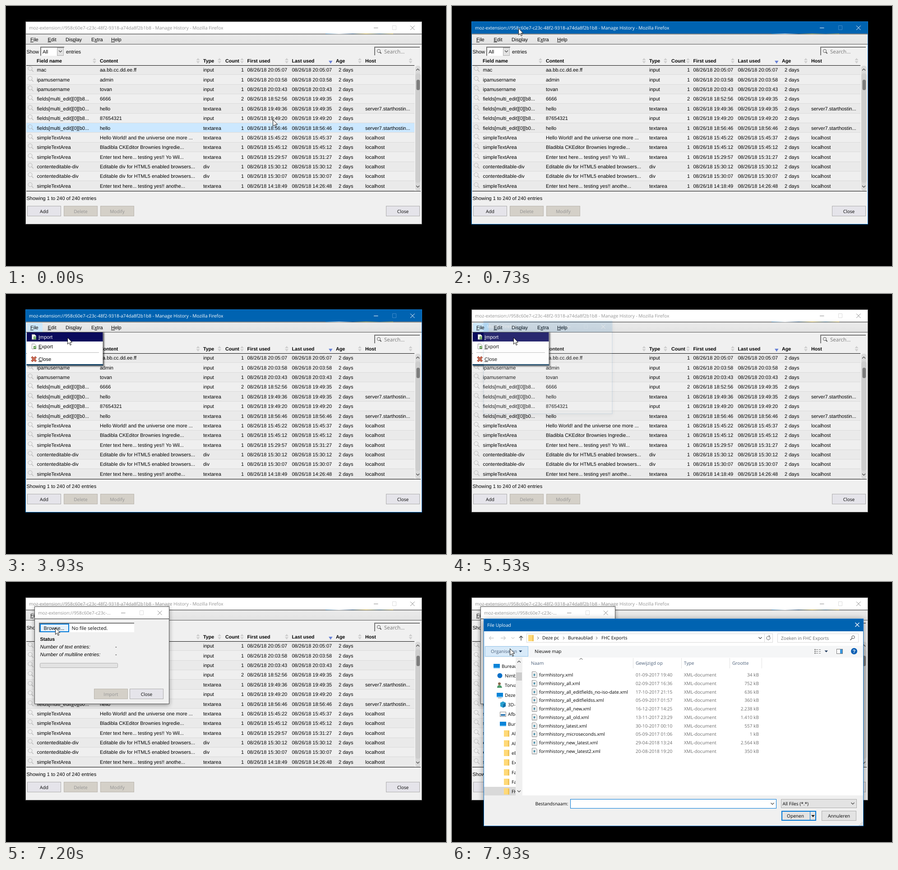
Animation of 975x575 px, one loop 8000 ms. Source, as an HTML page:

```html
<!DOCTYPE html>
<html lang="en">
<head>
<meta charset="utf-8">
<title>Manage History</title>
<style>
html, body { margin: 0; width: 100%; height: 100%; overflow: hidden; background: #000; }
svg { display: block; width: 975px; height: 575px; }
text { font: 11px "Liberation Sans", Arial, sans-serif; fill: #000; text-rendering: geometricPrecision; white-space: pre; }
.b { font-weight: bold; font-size: 10.7px; }
.i { font-style: italic; }
.u { font: 10.15px "Open Sans", sans-serif; }
.m { font: 10.8px "Open Sans", sans-serif; }
.w { fill: #fff; }
.g { fill: #6d6d6d; }
.d { fill: #929292; }
.h { fill: #4c607a; }
.k { text-decoration: underline; }
.r { text-anchor: end; }
.c { text-anchor: middle; }
#dialog { filter: drop-shadow(0 2px 5px rgba(0,0,0,.4)); }
#upload { filter: drop-shadow(0 3px 7px rgba(0,0,0,.45)); }
#dialog, #upload { transform-box: fill-box; transform-origin: center; }
</style>
</head>
<body>
<svg id="stage" viewBox="0 0 975 575" xmlns="http://www.w3.org/2000/svg"></svg>
<script>
const BLUE = '#0063b1', EDGE = '#1279cf', FOCUS = '#0078d7', FACE = '#f0f0f0';
const FRAME = 1000 / 15, LOOP = 8000;

const text = (x, y, s, cls = '') => `<text x="${x}" y="${y}" class="${cls}">${s}</text>`;
const rect = (x, y, w, h, fill, extra = '') =>
  `<rect x="${x}" y="${y}" width="${w}" height="${h}" fill="${fill}" ${extra}/>`;
const box = (x, y, w, h, fill, line, lw = 1) =>
  rect(x + lw / 2, y + lw / 2, w - lw, h - lw, fill, `stroke="${line}" stroke-width="${lw}"`);
const path = (d, line, lw = 1, fill = 'none') =>
  `<path d="${d}" fill="${fill}" stroke="${line}" stroke-width="${lw}"/>`;
const fill = (d, color) => `<path d="${d}" fill="${color}"/>`;
const circle = (x, y, r, color, line = 'none') =>
  `<circle cx="${x}" cy="${y}" r="${r}" fill="${color}" stroke="${line}"/>`;
const group = (id, body, extra = '') => `<g id="${id}" ${extra}>${body}</g>`;
const key = (s, n = 0) => s.slice(0, n) + `<tspan class="k">${s[n]}</tspan>` + s.slice(n + 1);

const chevron = (x, y, color = '#444', s = 1) => path(`M${x - 3.5} ${y - 2 * s}l3.5 ${3.5 * s}l3.5 ${-3.5 * s}`, color, 1.2);
const crumb = (x, y) => path(`M${x - 1} ${y - 3}l3 3l-3 3`, '#555');
const lens = (x, y, r, color, lw = 1) =>
  circle(x, y, r, 'none', color) + path(`M${x + r * .7} ${y + r * .7}l${r * .9} ${r * .9}`, color, lw);
const folder = (x, y, w = 12) => rect(x, y, w, 14, '#ffd977') + rect(x + w - 3, y + 1, 3, 13, '#efc35a');
const inset = (x, y, w, h, color) => rect(x, y, w, h, color) + path(`M${x + 1} ${y + h}V${y + 1}H${x + w}`, '#777', 2);

function button(x, y, w, label, off) {
  return box(x, y, w, 23, off ? '#d4d0c8' : '#e5e4ea', off ? '#b9b5ad' : '#adadad') +
    text(x + w / 2, y + 16, label, 'u c' + (off ? ' d' : ''));
}

function caption(x, y, line, faint) {
  return path(`M${x} ${y + .5}h9.5M${x + 81} ${y - 4.5}l9.5 9.5m0 -9.5l-9.5 9.5`, line) +
    path(`M${x + 41.5} ${y - 4.5}h8v9h-8z`, faint);
}

// Inactive title bar with the active one stacked above it
function titleBar(id, x, y, w, h, label, firstLabel = label) {
  const cx = x + w - 106, cy = y + 13, ty = y + 16.5;
  const frame = color => box(x - 1, y - 1, w + 2, h + 2, 'none', color);
  return frame('#555') + rect(x, y, w, 26, '#fff') + text(x + 7, ty, label, 'u d') + caption(cx, cy, '#888', '#ddd') +
    group(id, frame(EDGE) + rect(x, y, w, 26, BLUE) +
      `<text id="${id}Text" x="${x + 7}" y="${ty}" class="u w">${firstLabel}</text>` +
      caption(cx, cy, '#fff', '#3f8aca'));
}

const MULTI = 'fields[multi_edit][0][b', HOST = 'server7.starthostin...';
const ROWS = [
  ['mac', 'aa.bb.cc.dd.ee.ff', '20:05:07'],
  ['ipamusername', 'admin', '20:03:58'],
  ['ipamusername', 'tovan', '20:03:43'],
  [MULTI + '8...', '6666', '18:52:56', '19:49:35'],
  [MULTI + '0...', 'hello', '19:49:36', '19:49:35', HOST],
  [MULTI + '8...', '87654321', '19:49:20'],
  [MULTI + '0...', 'hello', '18:56:46', '', HOST],
  ['simpleTextArea', 'Hello World! and the universe one more ...', '15:45:22', '15:45:37'],
  ['simpleTextArea', 'Bladibla CKEditor Brownies Ingredie...', '15:45:12'],
  ['simpleTextArea', 'Enter text here... testing yes!! Yo Wil...', '15:29:57', '15:31:27'],
  ['contenteditable-div', 'Editable div for HTML5 enabled browsers...', '15:30:12'],
  ['contenteditable-div', 'Editable div for HTML5 enabled browsers...', '15:30:07'],
  ['simpleTextArea', 'Enter text here... testing yes!! anothe...', '14:18:49', '14:26:48'],
];
const STEP = 21.35, rowTop = i => Math.round(131 + STEP * i);

function tableRow([name, content, first, last, host], i) {
  const top = rowTop(i), y = Math.round(145.4 + STEP * i), day = '08/26/18 ';
  const type = name.includes('div') ? 'div' : i > 6 || host ? 'textarea' : 'input';
  return `<rect class="row" x="45" y="${top}" width="860" height="${rowTop(i + 1) - top}"/>` +
    rect(45, rowTop(i + 1) - 1, 860, 1, '#dadada') + lens(53.5, y - 7, 4.5, '#b8b8b8', 1.4) +
    text(68.5, y, name) + text(208, y, content) + text(437, y, type) +
    text(527, y, i === 3 ? 2 : 1, 'r') + text(534.5, y, day + first) + text(633.5, y, day + (last || first)) +
    text(737, y, '2 days') + text(796, y, host || (i > 6 ? 'localhost' : ''));
}

function mainWindow() {
  const heads = [[68, 'Field name'], [208, 'Content'], [437, 'Type'], [486, 'Count'], [534.5, 'First used'],
    [633.5, 'Last used'], [731, 'Age'], [796, 'Host']];
  const menus = [[54, 'File', 0], [92.5, 'Edit', 0], [132, 'Display', 3], [189, 'Extra', 1], [233, 'Help', 0]];
  return rect(44, 35, 877, 447, FACE) +
    rect(44, 61, 877, 24, 'url(#bar)') + rect(44, 61.5, 877, 1, '#222') + rect(708, 61, 150, 1, 'url(#theme)') +
    rect(44, 84, 877, 1, '#555') + rect(47, 64, 34, 20, '#cde8fb', 'id="fileHot"') +
    menus.map(([x, s, n]) => text(x, 78, key(s, n))).join('') +
    text(45.5, 105, 'Show') + inset(76, 90, 53, 20, '#fff') + text(81, 105, 'All') +
    box(113, 92, 15, 18, '#e3e3e3', '#adadad') + chevron(120.5, 100.5) + text(133, 105, 'entries') +
    inset(816, 90, 101, 19, FACE) + lens(826, 99.5, 3.5, '#555', 2) +
    `<text x="838" y="105" class="u" style="font-size:11.5px;fill:#777">Search...</text>` +
    heads.map(([x, s]) => text(x, 125, s, 'b')).join('') +
    [196, 425.5, 473, 523, 622, 784, 896.5].map(x =>
      fill(`M${x - 4} 120l4 -5l4 5zM${x - 4} 122l4 5l4 -5z`, '#cfcfcf')).join('') +
    fill('M715 121h8.5l-4.2 6.5z', '#6780d6') +
    ROWS.map(tableRow).join('') + rect(45, 131, 860, 1, '#111') +
    rect(907, 132, 11.5, 277, '#d9d9d9', 'rx="5"') + rect(907, 149, 11.5, 242, '#cecece', 'rx="5"') +
    rect(909.5, 163, 7.5, 23, '#7d7d7d', 'rx="3.5"') +
    chevron(912.5, 140.5, '#444', -1) + chevron(912.5, 399.5) +
    rect(45, 409, 874, 1, '#111') + text(45.5, 429, 'Showing 1 to 240 of 240 entries') +
    button(47, 442, 75, 'Add') + button(128, 442, 75, 'Delete', 1) + button(209, 442, 75, 'Modify', 1) +
    button(842, 442, 75, 'Close') +
    titleBar('mainOn', 44, 35, 877, 447,
      'moz-extension://958c60e7-c23c-48f2-9318-a74da8f2b1b8 - Manage History - Mozilla Firefox');
}

function menu() {
  const page = y => path(`M57.5 ${y - 5.5}h6l3 3v8h-9z`, '#999', 1, '#fff') +
    rect(61, y - 1, 6, 6, '#5a9a4a') + path(`M62.5 ${y + 1}l1.5 2l2 -3`, '#fff');
  return rect(47, 85, 170.5, 71, '#000', 'id="menuShade" opacity=".6" filter="url(#soft)"') +
    `<g clip-path="url(#menuClip)">` + rect(46, 85, 168.5, 72, '#fff') +
    rect(46, 85, 168.5, 20, '#0a0a5c', 'id="importHot"') + page(95) + page(116) +
    `<text id="importText" x="72" y="99">${key('Import')}</text>` + text(72, 120, key('Export')) +
    rect(54, 129, 152, 1, '#bbb') + text(72, 148, key('Close')) +
    path('M57 139l9.5 10m0 -10l-9.5 10', '#8c3a28', 4.5) + path('M57 139l9.5 10m0 -10l-9.5 10', '#d9745c', 2.5) +
    '</g>' + rect(45.5, 155, 169.5, 3, '#1d4a6b', 'id="menuEdge"');
}

function dialog() {
  return rect(63, 54, 298, 215, FACE) +
    group('dialogBody', rect(64, 81, 297, 1, '#222') + inset(73, 90, 211, 21, '#fff') +
      rect(76, 93, 63, 17, '#e5f1fb', 'id="browse" stroke-width="2"') +
      text(83.5, 106, 'Browse...', 'm') + text(145.5, 106, 'No file selected.', 'm') +
      text(75.5, 130, 'Status', 'b') + text(75.5, 147, 'Number of text entries:', 'i') +
      text(75.5, 164, 'Number of multiline entries:', 'i') + text(242, 147, '-') + text(242, 164, '-') +
      rect(75.5, 179.5, 172, 10, '#e3e3e3', 'rx="2" stroke="#b0b0b0"') +
      button(195, 236, 75, 'Import', 1) + button(274, 236, 75, 'Close')) +
    titleBar('dialogOn', 64, 55, 297, 214, 'moz-extension://958c60e7-c23c-...', 'Mozilla Firefox');
}

const FILES = [
  ['', '01-09-2017 19:40', '34'], ['_all', '02-09-2017 16:36', '752'],
  ['_all_editfields_no-iso-date', '17-10-2017 21:15', '636'], ['_all_editfieldss', '05-09-2017 01:57', '360'],
  ['_all_new', '16-12-2017 14:25', '2.238'], ['_all_old', '13-11-2017 23:29', '1.410'],
  ['_latest', '30-10-2017 00:10', '557'], ['_microseconds', '05-09-2017 01:06', '1'],
  ['_new_latest', '29-04-2018 13:24', '2.564'], ['_new_latest2', '20-08-2018 19:20', '350'],
];

function fileRow([suffix, date, size], i) {
  const y = Math.round(205 + 18.75 * i), base = y + 4;
  return path(`M177.500 ${y - 6.5}h8l2.500 2.500v10.500h-10.500z`, '#858585', 1, '#fff') +
    rect(179.5, y - 3, 6, 1, '#b5b5b5') + rect(179.5, y + 4, 6, 1, '#b5b5b5') +
    circle(182.5, y + .5, 2.2, '#4a8fa8') + text(193, base, `formhistory${suffix}.xml`, 'u') +
    text(407, base, date, 'u g') + text(514, base, 'XML-document', 'u g') + text(680, base, size + ' kB', 'u g r');
}

function navItem([x, label, icon], i) {
  const y = Math.round(185.5 + 21.38 * i), left = x - 18;
  const screen = rect(left, y - 5, 14, 10, '#0a84d8') + rect(left, y + 3, 14, 2, '#5cb8f2');
  const icons = {
    screen, cloud: circle(left + 7, y, 5.5, '#0a70c8'),
    person: circle(left + 6, y - 3, 3, '#8a6a50') + fill(`M${left + 1} ${y + 6}q0 -6 5 -6t6 6z`, '#4a9a6a'),
    pc: screen + rect(left + 3, y + 6, 8, 1, '#777'),
    cube: fill(`M${left + 1} ${y - 4}l6 -3l6 3v8l-6 3l-6 -3z`, '#28a0d0') + fill(`M${left + 7} ${y}l6 -4v8l-6 3z`, '#1470a8'),
    photo: box(left, y - 5, 14, 11, '#fff', '#888') + rect(left + 2, y, 10, 4, '#3a80b8'),
    folder: folder(left + 1, y - 7),
  };
  return icons[icon] + text(x, y + 4, label, 'u');
}

function upload() {
  const nav = [[110, 'Bureaublad', 'screen'], [117, 'NimbDisk', 'cloud'], [117, 'Torva', 'person'], [117, 'Deze pc', 'pc'],
    [124, '3D-objecten', 'cube'], [124, 'Afbeeldingen', 'photo'], [124, 'Bureaublad', 'screen'],
    ...['Al', 'Al', 'eB', 'Ex', 'Fa', 'Fa', 'FHC'].map(s => [132, s, 'folder'])];
  return rect(71, 82, 841, 458, FACE) + rect(71, 82, 841, 27, BLUE) + text(78, 99, 'File Upload', 'u w') +
    path('M893.5 90l9 9m0 -9l-9 9', '#fff', 1.2) + rect(71, 109, 841, 32, '#fff') +
    path('M92.5 124h-10m4 -4l-4 4l4 4', '#ccc', 1.3) + path('M108 124h10.5m-4 -4l4 4l-4 4', '#ccc', 1.3) +
    chevron(135, 124, '#ccc', .7) + path('M153 129.5v-10m-4 4l4 -4l4 4', '#444', 1.4) +
    box(165, 114, 546, 20, '#fff', '#d9d9d9') + folder(169, 117) + crumb(190, 124) + text(200, 127, 'Deze pc', 'u') +
    crumb(247, 124) + text(257, 127, 'Bureaublad', 'u') + crumb(320, 124) + text(331, 127, 'FHC Exports', 'u') +
    chevron(683, 124) + rect(692, 115, 1, 18, '#d9d9d9') +
    path('M704.5 122a4 4 0 1 1 -3 -2l2.5 0m-2 -2.5l2.5 2.5l-2.5 2.5', '#555') +
    box(721, 114, 180, 20, '#fff', '#d9d9d9') + text(729, 127.5, 'Zoeken in FHC Exports', 'u g') +
    circle(889, 122, 3.2, 'none', '#444') + path('M886.5 124.5l-4 4', '#444', 1.3) +
    rect(71, 141, 841, 26, '#f5f6f7') + group('organise', box(73, 142, 96, 23, '#d8eaf9', '#92c5ec')) +
    text(86, 157, 'Organiseren', 'u h') + fill('M148 151.5h7.5l-3.7 4z', '#1e395b') +
    text(183, 157, 'Nieuwe map', 'u') +
    [149, 153, 157].map(y => rect(803, y - .5, 3, 2, '#777') + rect(807, y, 4, 1, '#777') + rect(813, y, 4, 1, '#777')).join('') +
    fill('M825.5 151.5h7.5l-3.7 4z', '#1e395b') + box(852, 148, 14, 11, '#fff', '#777') + rect(860, 149, 5, 9, '#3a96dd') +
    circle(891, 153, 7, '#0a5fb4') + text(891, 157, '?', 'b w c') +
    rect(71, 167, 841, 305, '#fff') + rect(71, 453, 71, 19, '#d9d9d9') +
    `<g clip-path="url(#navClip)">${nav.map(navItem).join('')}</g>` +
    rect(141, 167, 15, 305, FACE) + rect(142, 200, 13, 18, '#cdcdcd') +
    chevron(148.5, 176, '#444', -1) + chevron(148.5, 463) +
    [401, 508, 615, 686].map(x => rect(x, 168, 1, 23, '#e2e2e2')).join('') + chevron(286, 170, '#777', -.8) +
    text(175, 183, 'Naam', 'u h') + text(407, 183, 'Gewijzigd op', 'u h') + text(514, 183, 'Type', 'u h') +
    text(621, 183, 'Grootte', 'u h') + FILES.map(fileRow).join('') +
    text(257.5, 494, 'Bestandsnaam:', 'u r') + box(262, 480, 457, 21, '#fff', FOCUS) + chevron(710, 490.5) +
    rect(266, 484, 1, 13, '#000', 'id="caret"') +
    box(729, 480, 168, 20, '#e3e3e3', '#adadad') + text(732.5, 494, 'All Files (*.*)', 'u') + chevron(888, 490) +
    box(730, 506, 77, 22, '#e3e3e3', FOCUS, 2) + text(761, 521, 'Openen', 'u c') + rect(793, 508, 1, 18, FOCUS) +
    fill('M796 515.5h8l-4 4.5z', '#111') + box(819, 506, 77, 22, '#e3e3e3', '#adadad') + text(857.5, 521, 'Annuleren', 'u c') +
    [0, 1, 2].map(i => [...Array(i + 1).keys()].map(j => rect(908 - 3 * j, 531 + 3 * i, 1.5, 1.5, '#b0b0b0')).join('')).join('') +
    box(70, 81, 842, 459, 'none', EDGE);
}

const gradient = (id, stops, dir) => `<linearGradient id="${id}" ${dir}>` +
  stops.map((c, i) => `<stop offset="${i / (stops.length - 1)}" stop-color="${c}"/>`).join('') + '</linearGradient>';
const stage = document.getElementById('stage');
stage.innerHTML = '<defs>' + gradient('bar', ['#ececec', '#e2e2e2'], 'x2="0" y2="1"') +
  gradient('theme', ['#4a90c0', '#fff', '#35608a', '#e0c050', '#4a7a9a', '#e0c050'], '') +
  '<filter id="soft" x="-5%" y="-20%" width="110%" height="140%"><feGaussianBlur stdDeviation="1.5"/></filter>' +
  '<clipPath id="menuClip"><rect id="menuMask" x="45" y="85" width="171" height="71"/></clipPath>' +
  '<clipPath id="navClip"><rect x="71" y="167" width="70" height="305"/></clipPath></defs>' +
  mainWindow() + group('menu', menu()) + group('dialog', dialog()) + group('upload', upload()) +
  group('cursor', path('M.5 .5V15l3.3 -3.2l2.5 5.4l2.2 -1l-2.5 -5.2h4.7z', '#000', .9, '#fff'));

const el = Object.fromEntries([...stage.querySelectorAll('[id]')].map(n => [n.id, n]));
const rows = [...stage.querySelectorAll('.row')];

// Pointer positions: step, x, y
const POINTER = [[-1, 598, 266], [0, 591, 251], [2, 540, 215], [4, 390, 140], [6, 230, 75], [8, 147, 49], [16, 147, 49],
  [23, 110, 43], [29, 71, 46], [33, 62, 66], [39, 62, 66], [42, 67, 95], [46, 80, 101], [52, 110, 95], [59, 136, 96],
  [93, 136, 96], [97, 109, 101], [116, 109, 101], [118, 121, 130], [119, 128, 147]];

function pointer(step) {
  const n = POINTER.findIndex(p => p[0] >= step);
  const b = POINTER[n], a = POINTER[Math.max(0, n - 1)];
  const f = b[0] === a[0] ? 0 : (step - a[0]) / (b[0] - a[0]);
  return [1, 2].map(i => Math.round(a[i] + (b[i] - a[i]) * f));
}

const show = (node, on) => node.setAttribute('visibility', on ? 'visible' : 'hidden');
const FADE = [.13, .45, .75, .93, 1], SCALE = [.957, .975, .988, .996, 1];

function openWindow(node, step) {
  const i = Math.min(step, 4);
  node.style.display = step < 0 ? 'none' : '';
  if (step < 0) return;
  node.style.opacity = FADE[i];
  node.style.transform = i < 4 ? `scale(${SCALE[i]})` : 'none';
}

function draw(step) {
  const [x, y] = pointer(step);
  el.cursor.setAttribute('transform', `translate(${x} ${y})`);

  const hoverY = pointer(step - 1)[1];
  rows.forEach((row, i) => {
    const hot = step < 8 && hoverY >= rowTop(i) && hoverY < rowTop(i + 1);
    row.setAttribute('fill', hot ? '#cce8ff' : i % 2 ? '#efefef' : '#eaeaea');
  });

  el.mainOn.setAttribute('opacity', step < 10 || step >= 83 ? 0 : step === 10 ? .5 : 1);
  show(el.fileHot, step >= 32 && step < 84);

  const height = { 33: 8, 34: 28, 35: 52 }[step] || 71;
  el.menu.style.display = step >= 33 && step < 84 ? '' : 'none';
  el.menuMask.setAttribute('height', height);
  el.menuShade.setAttribute('height', height + 4);
  el.menuEdge.setAttribute('y', 84 + height);
  show(el.importHot, step >= 41);
  el.importText.style.fill = step >= 41 ? '#fff' : '#000';

  openWindow(el.dialog, step - 83);
  show(el.dialogBody, step >= 86);
  show(el.dialogOn, step < 107);
  el.dialogOnText.textContent = step < 87 ? 'Mozilla Firefox' : 'moz-extension://958c60e7-c23c-...';
  el.browse.setAttribute('fill', step < 95 ? '#e1e1e1' : step >= 105 && step < 107 ? '#cce4f7' : '#e5f1fb');
  el.browse.setAttribute('stroke', step < 95 ? '#adadad' : FOCUS);
  el.browse.setAttribute('stroke-width', step < 95 ? 1 : 2);

  openWindow(el.upload, step - 109);
  show(el.caret, step < 118);
  show(el.organise, step >= 119);
}

const start = performance.now();
let shown = -1;
function tick() {
  const time = (performance.now() - start) % LOOP;
  const step = Math.min(119, Math.floor(time / FRAME + .06));
  if (step !== shown) draw(shown = step);
  requestAnimationFrame(tick);
}
tick();
</script>
</body>
</html>
```
